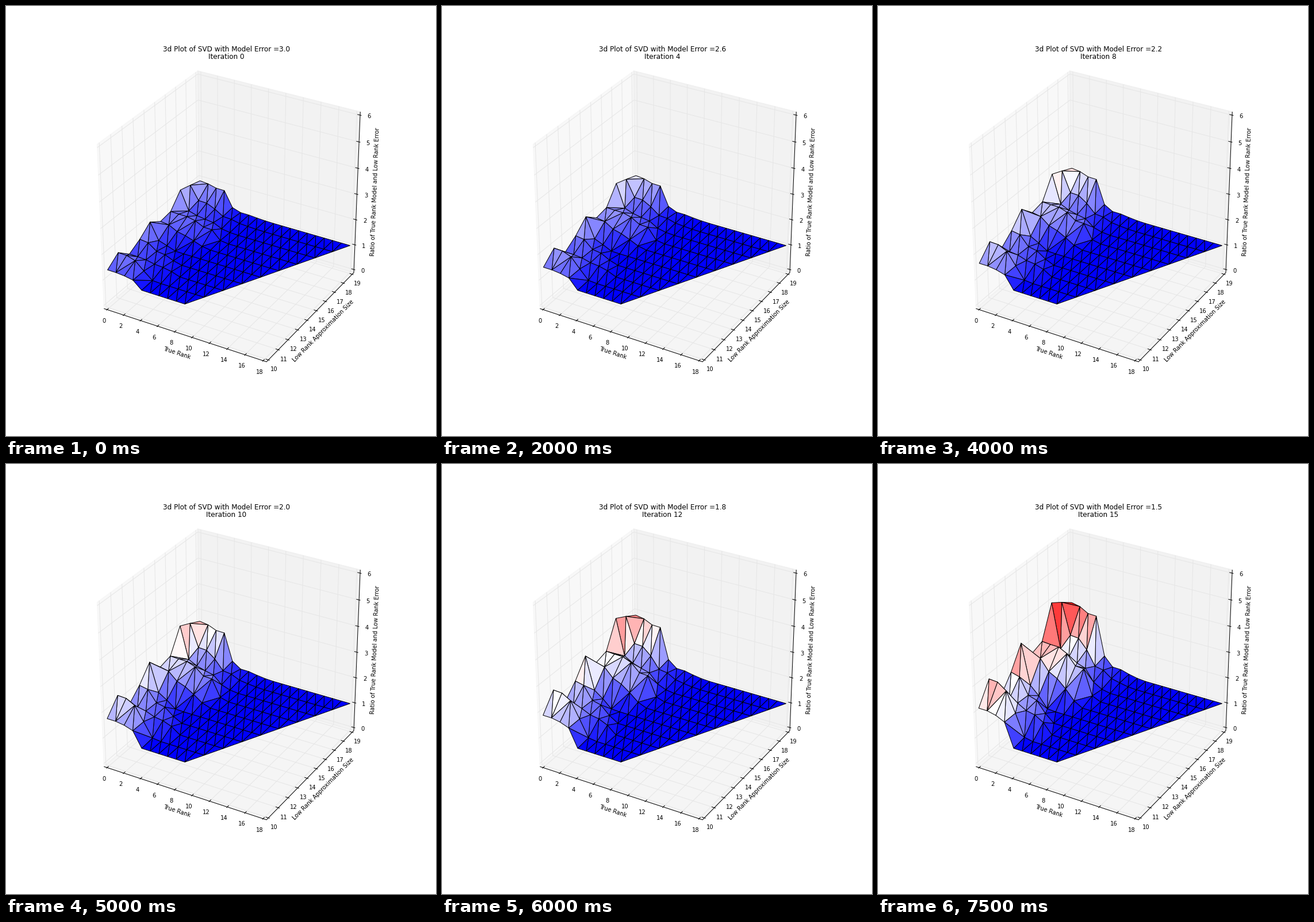
These frames come from a looping animation (748x748 px, 8000 ms). A matplotlib script:

```python
import numpy as np
import matplotlib.pyplot as plt
from matplotlib.animation import FuncAnimation
from matplotlib.collections import LineCollection, PolyCollection

SIZE, DPI = 748, 88
PT = 72 / DPI  # points per pixel
plt.rcParams["font.family"] = "DejaVu Sans"

LOW = np.array([0, 10, 0])
SPAN = np.array([18, 9, 6])
PAD = SPAN / 48
LO, HI = LOW - PAD, LOW + SPAN + PAD

# Camera basis: right, up and towards the viewer
DIST = 10
ELEV, AZIM = np.radians(30), np.radians(-60)
RIGHT = np.array([-np.sin(AZIM), np.cos(AZIM), 0])
NORMAL = np.array([np.cos(ELEV) * np.cos(AZIM),
                   np.cos(ELEV) * np.sin(AZIM), np.sin(ELEV)])
UP = np.cross(NORMAL, RIGHT)
SCALE = 0.775 * SIZE / 0.185


def project(points):
    """Return pixel positions and nearness of data points."""
    p = (np.asarray(points, float) - LOW) / SPAN - 0.5
    near = p @ NORMAL
    x = 93.5 + SCALE * (0.095 + p @ RIGHT / (DIST - near))
    y = 74.8 + SCALE * (0.09 - p @ UP / (DIST - near))
    return np.stack([x, y], axis=-1), near


# Squared excess error for each size (10 to 19), by true rank from 0
EXCESS = [
    [8.1, 8.1, 7.4, 6.0],
    [17, 16.7, 13.7, 5.9, 0.3],
    [6, 5.9, 5.4, 3.9, 3.4, 2.1],
    [12, 11, 5.1, 4.3, 1.5],
    [22.4, 4.7, 2.4, 0.1],
    [12.8, 11.7, 7.3, 5.7, 3.3, 0.95],
    [14.6, 14.3, 14.2, 12.2, 8.1, 7.9, 0.7],
    [32.7, 8.8, 6.5, 5.3, 4.4, 1.3, 0.3],
    [27.8, 11.1, 10.8, 7.1, 2.6, 2.2, 0.8, 0.4, 0.1],
    [22.8, 21.8, 19.1, 18.9, 3.2, 1, 0.95, 0.46, 0.13],
]

# Cells split along the rising diagonal; the others use the falling one
RISING = {(1, 0), (3, 0), (0, 4), (3, 4), (1, 5), (2, 5),
          (4, 5), (5, 5), (0, 6), (0, 8)}

nodes = [(x, j) for j in range(10) for x in range(10 + j)]
index = {node: k for k, node in enumerate(nodes)}
excess = np.array([EXCESS[j][x] if x < len(EXCESS[j]) else 0
                   for x, j in nodes])


def make_triangles():
    out = []
    for j in range(9):
        for x in range(10 + j):
            a, b, c, d = (x, j), (x + 1, j), (x + 1, j + 1), (x, j + 1)
            if b not in index:
                out.append((a, c, d))
            elif (x, j) in RISING:
                out += [(a, b, c), (a, c, d)]
            else:
                out += [(a, b, d), (b, c, d)]
    return np.array([[index[n] for n in tri] for tri in out])


triangles = make_triangles()

fig = plt.figure(figsize=(SIZE / DPI, SIZE / DPI), dpi=DPI, facecolor="white")
ax = fig.add_axes([0, 0, 1, 1])
ax.set_xlim(0, SIZE)
ax.set_ylim(SIZE, 0)
ax.axis("off")


def label(x, y, text, size=10, **kw):
    kw = {"ha": "center", "va": "center", **kw}
    return ax.text(x, y, text, fontsize=size * PT, color="black", **kw)


def lines(paths, color, zorder):
    ax.add_collection(LineCollection([project(p)[0] for p in paths],
                                     colors=color, linewidths=PT,
                                     zorder=zorder), autolim=False)


def draw_box():
    (x0, y0, z0), (x1, y1, z1) = LO, HI
    panes = [
        ([(x0, y0, z0), (x0, y1, z0), (x0, y1, z1), (x0, y0, z1)], 0.95),
        ([(x0, y1, z0), (x1, y1, z0), (x1, y1, z1), (x0, y1, z1)], 0.90),
        ([(x0, y0, z0), (x1, y0, z0), (x1, y1, z0), (x0, y1, z0)], 0.925),
    ]
    for corners, grey in panes:
        ax.fill(*project(corners)[0].T, color=(grey,) * 3, alpha=0.5,
                lw=PT, zorder=1)

    xt, yt, zt = range(0, 19, 2), range(10, 20), range(7)
    grid = [[(t, y0, z0), (t, y1, z0), (t, y1, z1)] for t in xt]
    grid += [[(x1, t, z0), (x0, t, z0), (x0, t, z1)] for t in yt]
    grid += [[(x1, y1, t), (x0, y1, t), (x0, y0, t)] for t in zt]
    lines(grid, (0.9, 0.9, 0.9), 2)

    # Tick positions, outward direction and label offset in pixels
    axes = [
        (xt, lambda t: (t, y0, z0), (0, -0.75, 0), (-5.7, 19.7)),
        (yt, lambda t: (x1, t, z0), (1.5, 0, 0), (9.4, 16.7)),
        (zt, lambda t: (x1, y1, t), (1.5, 0, 0), (15.4, 2.6)),
    ]
    black = [[(x0, y0, z0), (x1, y0, z0), (x1, y1, z0), (x1, y1, z1)]]
    for ticks, place, out, (dx, dy) in axes:
        for t in ticks:
            p, d = np.array(place(t)), np.array(out)
            black.append([p + 0.1 * d, p - 0.2 * d])
            px, py = project(p)[0]
            label(px + dx, py + dy, str(t))
    lines(black, "black", 3)

    label(297, 604, "True Rank", rotation=-18.1)
    label(552, 565, "Low Rank Approximation Size", rotation=45.5)
    label(642, 323, "Ratio of True Rank Model and Low Rank Error",
          rotation=87.8)


draw_box()
title = label(383.4, 79, "", 12, va="baseline")
subtitle = label(383.4, 92, "", 12, va="baseline")
surface = PolyCollection([], cmap="bwr", edgecolors="black",
                         linewidths=PT, zorder=5)
surface.set_clim(1, 3.57)
ax.add_collection(surface, autolim=False)


def update(i):
    error = 3 - 0.1 * i
    z = np.sqrt(1 + excess / error ** 2)
    points = [(x, 10 + j, h) for (x, j), h in zip(nodes, z)]
    pixels, near = project(points)
    order = np.argsort(near[triangles].mean(axis=1), kind="stable")
    tris = triangles[order]
    surface.set_verts(pixels[tris])
    surface.set_array(z[tris].mean(axis=1))
    title.set_text(f"3d Plot of SVD with Model Error ={error:.1f}")
    subtitle.set_text(f"Iteration {i}")
    return surface, title, subtitle


anim = FuncAnimation(fig, update, frames=16, interval=500, repeat=True,
                     repeat_delay=0, blit=False)
plt.show()
```
